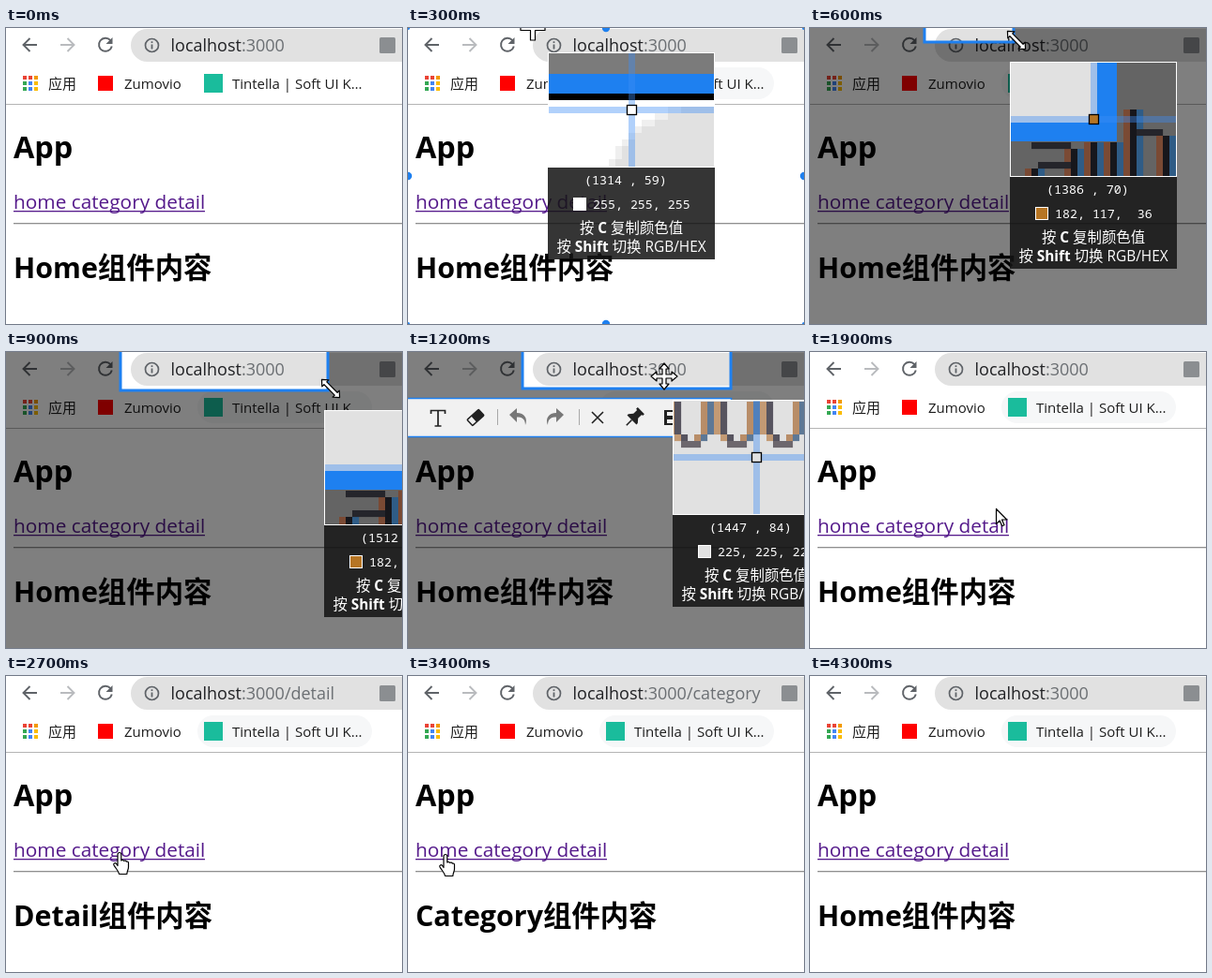
An HTML page that plays this animation: 422 by 316 pixels, repeating every 4500 ms.

```html
<!DOCTYPE html>
<html lang="zh-CN">
<head>
<meta charset="utf-8">
<title>App</title>
<style>
html, body { margin: 0; width: 100%; height: 100%; overflow: hidden; background: #fff; }
svg { display: block; width: 422px; height: 316px; }
text { font-family: "Open Sans", "Noto Sans", "Noto Sans CJK SC", "Noto Sans CJK", sans-serif; white-space: pre; }
.h { font-size: 30.4px; font-weight: 700; }
.bm { font-size: 15px; fill: #1c1c1c; }
.tip { font-size: 15.4px; fill: #fff; text-anchor: middle; }
.mono { font-family: "Noto Sans Mono", "DejaVu Sans Mono", monospace; font-size: 13.3px; fill: #fff; }
.cur path { fill: #fff; stroke: #000; stroke-width: 1.2; stroke-linejoin: round; }
</style>
</head>
<body>
<svg viewBox="0 0 422 316" xmlns="http://www.w3.org/2000/svg">
  <defs>
    <clipPath id="view"><rect x="1" y="1" width="176" height="121"/></clipPath>
  </defs>

  <!-- browser bar -->
  <g fill="none" stroke-width="1.9">
    <path d="M33 18H19M25.5 11L18.5 18L25.5 25" stroke="#5f6368"/>
    <path d="M58 18H72M65.5 11L72.5 18L65.5 25" stroke="#b9bbbe"/>
    <path d="M111.3 13.2A7 7 0 1 0 112.8 19.5" stroke="#5f6368"/>
  </g>
  <path d="M113.5 10V17H106.5Z" fill="#5f6368"/>
  <rect x="133" y="1" width="330" height="35" rx="17.5" fill="#e1e1e1"/>
  <circle cx="155.5" cy="18.5" r="7" fill="none" stroke="#5f6368" stroke-width="1.7"/>
  <path d="M155.5 17.5V22.5M155.5 14.3V16" stroke="#5f6368" stroke-width="1.8"/>
  <text x="175.5" y="25" font-size="18" fill="#202124">localhost<tspan id="path" fill="#6b6f73"></tspan></text>
  <rect x="398" y="10" width="17" height="17" rx="1.5" fill="#8b8e91"/>

  <!-- bookmarks -->
  <rect id="pill" x="204" y="42" width="186" height="34" rx="17" fill="#f6f7f8"/>
  <g id="apps"></g>
  <text class="bm" x="45" y="65">应用</text>
  <rect x="98" y="51" width="16" height="16" fill="#f00"/>
  <text class="bm" x="126" y="65">Zumovio</text>
  <rect x="211" y="49" width="20" height="20" fill="#1abc9c"/>
  <text class="bm" x="241" y="65">Tintella | Soft UI K…</text>
  <rect y="81" width="422" height="1" fill="#b4b4b4"/>

  <!-- page -->
  <text class="h" x="8" y="139" style="font-size:32.4px">App</text>
  <text x="8" y="193" font-size="20.8" fill="#551a8b">home category detail</text>
  <rect x="8" y="195" width="204" height="1.3" fill="#551a8b"/>
  <rect x="8" y="208" width="414" height="1" fill="#8f8f8f"/>
  <rect x="8" y="209" width="414" height="1" fill="#dcdcdc"/>
  <text id="title" class="h" x="8" y="267"></text>

  <!-- screen capture -->
  <g id="handles" fill="#1e80f0"></g>
  <g id="shade">
    <path id="dim" fill-rule="evenodd" fill-opacity=".5"/>
    <rect id="frame" x="122" y="-10" fill="none" stroke="#1e80f0" stroke-width="3"/>
  </g>
  <g id="tools">
    <rect x="-10" y="49.5" width="354.5" height="41" fill="#f1f1f1" stroke="#1e80f0" stroke-width="1.5"/>
    <path d="M95.500 61V78M182.500 61V78" stroke="#a8a8a8"/>
    <path d="M24.500 66V62.500H39.500V66M32 62.500V79M28.500 79H35.500" fill="none" stroke="#222" stroke-width="1.700"/>
    <g transform="translate(72 70) rotate(-42)">
      <rect x="-9" y="-5" width="18" height="10" rx="1.500" fill="#222"/>
      <rect x="-7.500" y="-3.500" width="5" height="7" fill="#f1f1f1"/>
    </g>
    <path id="undo" d="M125 78C125 71 121 69.500 116 69.500V75L108 67L116 60V65C124 65 128 71 125 78Z" fill="#777"/>
    <use href="#undo" transform="translate(274) scale(-1 1)"/>
    <path d="M196 64L208 76M208 64L196 76" stroke="#222" stroke-width="1.600"/>
    <g transform="translate(242 69) rotate(45)" fill="#222">
      <path d="M-5 -9H5V-6.500H3.500V-1L7 3V5H-7V3L-3.500 -1V-6.500H-5Z"/>
      <rect x="-.8" y="5" width="1.600" height="8"/>
    </g>
    <path d="M273 62H286L289 65V78H273Z" fill="#222"/>
    <path d="M276 64H284V68H276ZM276 72H286V76H276Z" fill="#f1f1f1"/>
    <path d="M317 63H327V75H317ZM317 67H313V79H323V75" fill="none" stroke="#222" stroke-width="1.800"/>
  </g>

  <g id="lens">
    <rect width="178" height="221" fill="#141414" fill-opacity=".86"/>
    <g clip-path="url(#view)">
      <g id="zcross"></g>
      <g id="zdrag"></g>
      <g id="zmove"></g>
      <path d="M86 0H93V58H86ZM0 58H86V65H0ZM93 58H178V65H93Z" fill="#3c8cf5" fill-opacity=".4"/>
      <path id="tail" d="M86 65H93V122H86Z" fill="#3c8cf5" fill-opacity=".4"/>
    </g>
    <rect x=".5" y=".5" width="177" height="122" fill="none" stroke="#fff"/>
    <rect id="dot" x="84.500" y="56.500" width="10" height="10" stroke="#000" stroke-width="1.300"/>
    <text id="pos" class="mono" x="39" y="141"></text>
    <rect id="chip" x="27.500" y="155.500" width="13" height="13" stroke="#fff"/>
    <text id="rgb" class="mono" x="48" y="167"></text>
    <text class="tip" x="89" y="193">按 <tspan font-weight="700">C</tspan> 复制颜色值</text>
    <text class="tip" x="89" y="213">按 <tspan font-weight="700">Shift</tspan> 切换 RGB/HEX</text>
  </g>

  <g id="cursor" class="cur">
    <path id="arrow" d="M.5 .5V16.500L4.200 13L6.700 18.700L9 17.700L6.500 12H11.800Z"/>
    <path id="hand" d="M5 14.500V2.400A1.900 1.900 0 0 1 8.800 2.400V9A1.700 1.700 0 0 1 11.600 9.500A1.600 1.600 0 0 1 14.300 10.200A1.500 1.500 0 0 1 16.500 11.600V16C16.500 19 15 20 14.800 23.500H6.600C6.200 20.500 3.400 18 1 14C0 12 2.500 11 3.600 12.500Z"/>
    <path id="cross" d="M-2.500 -13H2.500V-2.500H13V2.500H2.500V13H-2.500V2.500H-13V-2.500H-2.500Z"/>
    <path id="drag" transform="rotate(45)" d="M-13.500 0L-8 -5V-2H8V-5L13.500 0L8 5V2H-8V5Z"/>
    <path id="move" d="M0 -14L5 -8H2V-2H8V-5L14 0L8 5V2H2V8H5L0 14L-5 8H-2V2H-8V5L-14 0L-8 -5V-2H-2V-8H-5Z"/>
  </g>
</svg>
<script>
const LOOP = 4500, STEP = 100;
const $ = id => document.getElementById(id);
const show = (id, on) => $(id).setAttribute('display', on ? 'inline' : 'none');
const set = (id, attrs) => { for (const k in attrs) $(id).setAttribute(k, attrs[k]); };

function add(parent, tag, attrs) {
  const el = document.createElementNS('http://www.w3.org/2000/svg', tag);
  for (const k in attrs) el.setAttribute(k, attrs[k]);
  $(parent).appendChild(el);
}
const box = (parent, x, y, width, height, fill) => add(parent, 'rect', { x, y, width, height, fill });

// Lens settings per cursor kind: offset, origin of the reading, sampled colour
const LENS = {
  cross: { dx: 16, dy: 26, ox: 1165, oy: 33, rgb: [255, 255, 255] },
  drag: { dx: -7, dy: 23, ox: 1173, oy: 34, rgb: [182, 117, 36] },
  move: { dx: 9, dy: 25, ox: 1165, oy: 33, rgb: [225, 225, 225] }
};

// Cursor path: step, kind, x, y
const PATH = [
  [0, '', 0, 0],
  [1, 'cross', 230, 60], [2, 'cross', 154, 14], [3, 'cross', 133, 0], [4, 'cross', 122, -8],
  [5, 'drag', 162, 3], [6, 'drag', 220, 13], [9, 'drag', 346, 39],
  [10, 'move', 336, 33], [12, 'move', 273, 26],
  [13, 'arrow', 316, 66], [15, 'arrow', 312, 64], [17, 'arrow', 215, 118],
  [18, 'arrow', 199, 157], [19, 'arrow', 198, 167],
  [20, 'hand', 186, 179], [21, 'hand', 181, 183], [24, 'hand', 181, 183],
  [28, 'hand', 92, 190], [31, 'hand', 92, 190], [34, 'hand', 33, 190],
  [37, 'hand', 33, 190], [38, 'hand', 46, 188],
  [39, 'arrow', 150, 172], [40, 'arrow', 258, 152], [41, 'arrow', 358, 122], [42, 'arrow', 396, 90],
  [43, '', 0, 0]
];

function pointer(n) {
  let i = PATH.length - 1;
  while (PATH[i][0] > n) i--;
  const [s, kind, x, y] = PATH[i], next = PATH[i + 1];
  if (!next || next[1] !== kind) return { kind, x, y };
  const k = (n - s) / (next[0] - s);
  return { kind, x: Math.round(x + (next[2] - x) * k), y: Math.round(y + (next[3] - y) * k) };
}

const cell = (id, c, r, fill) => box(id, 2 + c * 7, 2 + r * 7, 7.1, 7.1, fill);

// Window edge and rounded field
function buildCross() {
  box('zcross', 0, 0, 178, 122, '#fff');
  box('zcross', 0, 0, 178, 23, '#7b7b7b');
  box('zcross', 0, 23, 178, 21, '#1e80f0');
  box('zcross', 0, 44, 178, 7, '#000');
  for (let r = 8; r < 18; r++)
    for (let c = 0; c < 26; c++) {
      const d = Math.hypot(c * 7 + 5 - 178, r * 7 + 5 - 178);
      if (d < 128) cell('zcross', c, r, d > 122 ? '#efefef' : '#e1e1e1');
    }
}

// Selection corner above shaded letters
function buildDrag() {
  const stem = (c, top) => {
    for (let r = top; r < 18; r++) ['#7a4a34', '#17171c', '#2f5c86'].forEach((ink, i) => cell('zdrag', c - 1 + i, r, ink));
  };
  const bar = (from, to, r) => { for (let c = from; c <= to; c++) cell('zdrag', c, r, '#25252b'); };
  box('zdrag', 0, 0, 178, 122, '#646464');
  stem(9, 13);
  stem(3, 16);
  bar(3, 8, 12);
  bar(4, 8, 15);
  stem(12, 12);
  stem(15, 12);
  stem(18, 7);
  bar(19, 22, 10);
  stem(23, 11);
  box('zdrag', 0, 0, 114, 85, '#1e80f0');
  box('zdrag', 0, 0, 93, 65, '#e1e1e1');
}

// Bowls of letters with coloured fringes
function buildMove() {
  box('zmove', 0, 0, 178, 122, '#e1e1e1');
  for (const mid of [2, 9, 16, 23]) {
    for (let r = 0; r < 6; r++) {
      const half = r < 5 ? 3 : 2;
      cell('zmove', mid - half, r, '#c39a74');
      cell('zmove', mid - half + 1, r, '#57545f');
      cell('zmove', mid + half - 1, r, '#b88d68');
      cell('zmove', mid + half, r, '#5d7896');
    }
    for (let c = -1; c < 2; c++) cell('zmove', mid + c, 6, '#6d676d');
  }
}

function build() {
  const tints = ['#ea4335', '#ea4335', '#f29900', '#34a853', '#4285f4', '#fbbc04', '#34a853', '#4285f4', '#fbbc04'];
  tints.forEach((c, i) => box('apps', 18 + i % 3 * 6, 51 + Math.floor(i / 3) * 6, 4, 4, c));
  for (const cx of [0, 211, 422])
    for (const cy of [0, 158, 316])
      if (cx !== 211 || cy !== 158) add('handles', 'circle', { cx, cy, r: cx === 211 || cy === 158 ? 4.2 : 2 });
  buildCross();
  buildDrag();
  buildMove();
}

function drawLens(p) {
  const lens = LENS[p.kind];
  show('lens', lens);
  if (!lens) return;
  const x = p.x + lens.dx, y = p.y + lens.dy, fill = `rgb(${lens.rgb})`;
  set('lens', { transform: `translate(${x} ${y})` });
  for (const k in LENS) show('z' + k, k === p.kind);
  show('tail', p.kind !== 'drag');
  set('dot', { fill });
  set('chip', { fill });
  $('pos').textContent = `(${lens.ox + x} , ${lens.oy + y})`;
  $('rgb').textContent = lens.rgb.map(v => String(v).padStart(3)).join(', ');
}

function drawShade(n, p) {
  const on = n >= 5 && n < 15;
  show('shade', on);
  show('tools', n >= 10 && n < 15);
  show('handles', n >= 1 && n < 5);
  if (!on) return;
  const x = p.kind === 'drag' ? p.x - 3 : 344, y = p.kind === 'drag' ? p.y + 2 : 39;
  set('dim', { d: `M0 0H422V316H0ZM122 0H${x}V${y}H122Z` });
  set('frame', { width: x - 122, height: y + 10 });
}

function draw(t) {
  const n = Math.floor(t % LOOP / STEP), p = pointer(n);
  const page = n >= 23 && n < 29 ? 'Detail' : n >= 29 && n < 36 ? 'Category' : 'Home';
  $('path').textContent = ':3000' + (page === 'Home' ? '' : '/' + page.toLowerCase());
  $('title').textContent = page + '组件内容';
  show('pill', n > 0);
  drawShade(n, p);
  drawLens(p);
  set('cursor', { transform: `translate(${p.x} ${p.y})` });
  for (const k of ['arrow', 'hand', 'cross', 'drag', 'move']) show(k, k === p.kind);
}

build();
const start = performance.now();
function tick() {
  draw(performance.now() - start);
  requestAnimationFrame(tick);
}
tick();
</script>
</body>
</html>
```
